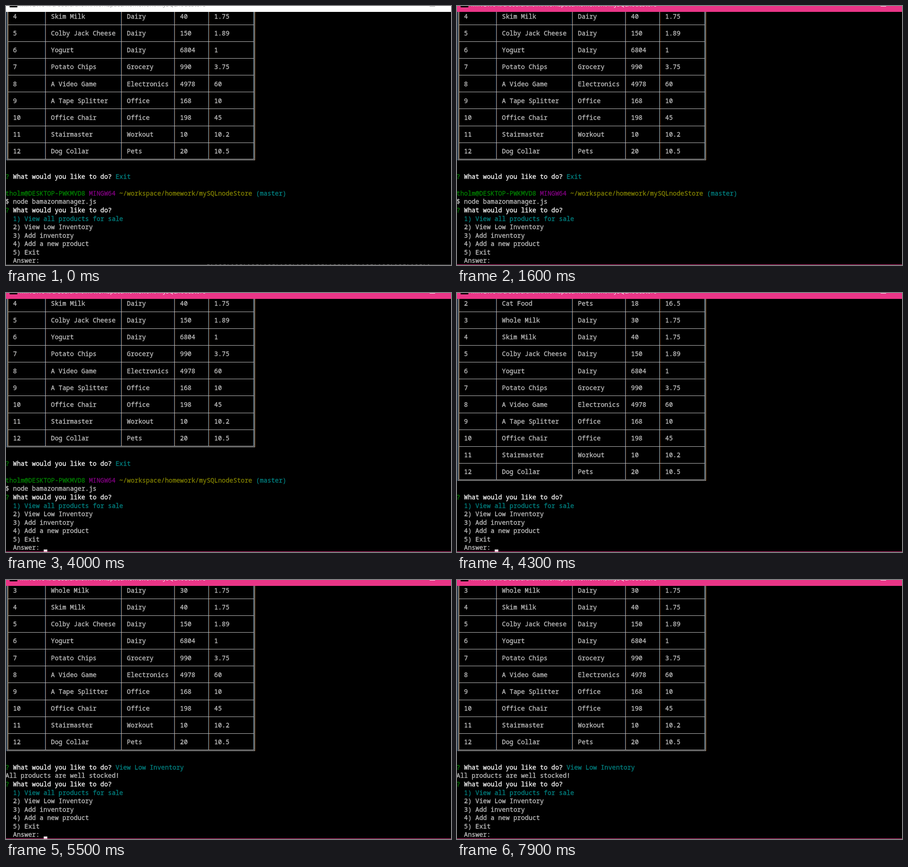
An HTML page with a canvas for the animation above (8 s loop, 980 by 571 pixels).

```html
<!DOCTYPE html>
<html lang="en">
<head>
<meta charset="utf-8">
<title>Store manager terminal</title>
<style>
  html, body { margin: 0; width: 100%; height: 100%; overflow: hidden; background: #000; }
  canvas { display: block; }
</style>
</head>
<body>
<canvas id="stage" width="980" height="571"></canvas>
<script>
const ctx = document.getElementById('stage').getContext('2d');
const LOOP = 8000;
const CELL_W = 8.36, LINE_H = 18.56, LEFT = -1.2, LAST_BASELINE = 566.3;
const GREY = '#c0c0c0', WHITE = '#fff', TEAL = '#008080', GREEN = '#008000',
      PURPLE = '#800080', OLIVE = '#808000', PINK = '#ea3587';

const products = [
  [2, 'Cat Food', 'Pets', 18, 16.5],
  [3, 'Whole Milk', 'Dairy', 30, 1.75],
  [4, 'Skim Milk', 'Dairy', 40, 1.75],
  [5, 'Colby Jack Cheese', 'Dairy', 150, 1.89],
  [6, 'Yogurt', 'Dairy', 6804, 1],
  [7, 'Potato Chips', 'Grocery', 990, 3.75],
  [8, 'A Video Game', 'Electronics', 4978, 60],
  [9, 'A Tape Splitter', 'Office', 168, 10],
  [10, 'Office Chair', 'Office', 198, 45],
  [11, 'Stairmaster', 'Workout', 10, 10.2],
  [12, 'Dog Collar', 'Pets', 20, 10.5]
];
const textColumns = [2, 12, 32, 46, 55];
const ruleColumns = [10, 30, 44, 53];
const menu = ['View all products for sale', 'View Low Inventory', 'Add inventory',
              'Add a new product', 'Exit'];
const cursorToggles = [1100, 1600, 2100, 2600, 3000, 3500, 4000, 4500, 5000,
                       6000, 6400, 6900, 7400, 7900];

const columnX = col => LEFT + col * CELL_W;
const ruleX = col => columnX(col) + 4.45;
const baseline = line => LAST_BASELINE - line * LINE_H;

function rect(color, x, y, w, h) {
  ctx.fillStyle = color;
  ctx.fillRect(x, y, w, h);
}

// Subpixel rendering: blue leans left, red leans right.
function verticalRule(x, bottom) {
  ctx.globalCompositeOperation = 'lighter';
  ['#00c', '#0c0', '#c00'].forEach((color, i) =>
    rect(color, x - 0.55 + (i - 1) / 3, 13, 1.1, bottom - 13));
  ctx.globalCompositeOperation = 'source-over';
}

// Lines are counted upwards from the bottom of the window.
function write(line, col, text, color = GREY) {
  ctx.fillStyle = ctx.strokeStyle = color;
  ctx.lineWidth = 0.35;
  [...String(text)].forEach((ch, i) => {
    ctx.fillText(ch, columnX(col + i), baseline(line));
    ctx.strokeText(ch, columnX(col + i), baseline(line));
  });
}

function question(line, answer = '') {
  write(line, 0, '?', GREEN);
  write(line, 2, 'What would you like to do?', WHITE);
  write(line, 29, answer, TEAL);
}

function drawTable(lastRowLine) {
  const bottom = Math.floor(baseline(lastRowLine) + 12.5);
  for (const col of [0, 65]) {
    const outward = col ? 1.1 : -1.1;
    verticalRule(ruleX(col) - outward, bottom + 1);
    verticalRule(ruleX(col) + outward, bottom + 3);
  }
  ruleColumns.forEach(col => verticalRule(ruleX(col), bottom));

  products.forEach((row, i) => {
    const line = lastRowLine + 2 * (products.length - 1 - i);
    if (baseline(line) < 20) return;
    row.forEach((value, c) => write(line, textColumns[c], value));
    if (line > lastRowLine) rect(GREY, 5, Math.round(baseline(line) + 12.8), 541, 1);
  });
  rect(GREY, 4, bottom, 542, 1);
  rect(GREY, 2, bottom + 2, 546, 1);
}

function drawShellHistory() {
  question(10, 'Exit');
  write(8, 0, 'tholm@DESKTOP-PWKMVD8', GREEN);
  write(8, 22, 'MINGW64', PURPLE);
  write(8, 30, '~/workspace/homework/mySQLnodeStore', OLIVE);
  write(8, 66, '(master)', TEAL);
  write(7, 0, '$ node bamazonmanager.js');
}

function drawMenu(selected, typed, cursorOn) {
  question(6);
  menu.forEach((item, i) =>
    write(5 - i, 2, `${i + 1}) ${item}`, i === selected ? TEAL : GREY));
  write(0, 2, 'Answer: ' + typed);
  if (cursorOn) rect(WHITE, Math.round(columnX(10 + typed.length) + 0.4), 565.5, 8, 4.5);
}

function drawWindowFrame(focused) {
  const ink = focused ? WHITE : '#999';
  rect(focused ? PINK : WHITE, 0, 0, 980, 13);
  rect('#000', 8, 0, 17, 3);
  ctx.fillStyle = ink;
  ctx.font = '13.1px "Open Sans", sans-serif';
  ctx.fillText('MINGW64:/c/Users/tholm/workspace/homework/mySQLnodeStore', 31, 1);
  rect(ink, 933, 0, 12, 1);

  if (focused) {
    rect(PINK, 0, 570, 980, 1);
  } else {
    rect('#555', 0, 570, 980, 1);
    for (let x = 443; x < 935; x += 9) rect('#aaa', x, 570, 2 + x % 4, 1);
  }
}

function draw(t) {
  rect('#000', 0, 0, 980, 571);
  ctx.font = '13.93px "Noto Sans Mono", monospace';

  if (t < 4300) {
    drawTable(13);
    drawShellHistory();
  } else if (t < 5500) {
    drawTable(9);
  } else {
    drawTable(11);
    question(8, 'View Low Inventory');
    write(7, 0, 'All products are well stocked!');
  }
  const choosing = t >= 5100 && t < 5500;
  const cursorOn = cursorToggles.filter(time => time <= t).length % 2 === 1;
  drawMenu(choosing ? 1 : 0, choosing ? '2' : '', cursorOn);
  drawWindowFrame(t >= 600);
}

function tick() {
  draw(performance.now() % LOOP);
  requestAnimationFrame(tick);
}
tick();
</script>
</body>
</html>
```
